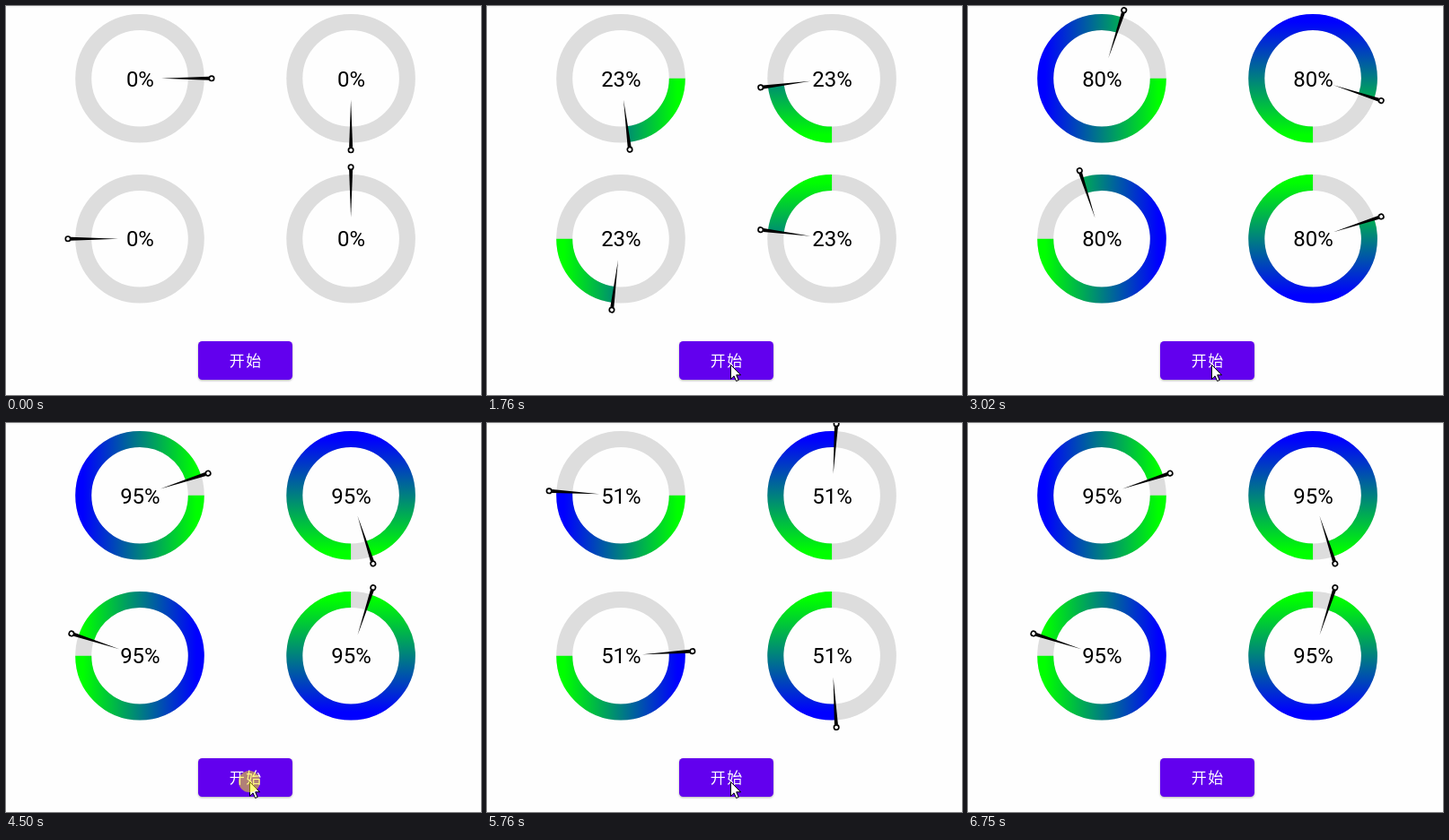
Recreate the animation shown at these times as an HTML page. Size 529 by 434 pixels, loop 7.74 s.

```html
<!DOCTYPE html>
<html lang="zh">
<head>
<meta charset="utf-8">
<style>
  html, body { margin: 0; width: 100%; height: 100%; overflow: hidden; background: #fefefe; }
  svg { display: block; width: 529px; height: 434px; }
  .value { font: 24px Roboto, sans-serif; text-anchor: middle; fill: #000; }
  .label { font: 17px "Noto Sans CJK SC", "Noto Sans CJK", sans-serif; letter-spacing: 1.5px; fill: #fff; }
  .button { fill: #6200ee; filter: drop-shadow(0 1px 1px rgba(0, 0, 0, .3)); }
</style>
</head>
<body>
<svg viewBox="0 0 529 434">
  <defs>
    <linearGradient id="sweep" gradientUnits="userSpaceOnUse" x1="63" y1="0" x2="-63" y2="0">
      <stop offset="0" stop-color="#0f0"/>
      <stop offset="1" stop-color="#00f"/>
    </linearGradient>
  </defs>
  <rect width="529" height="1.5" fill="#f6f6f6"/>
  <g id="dials"></g>
  <rect class="button" x="214" y="374" width="105" height="43" rx="4.5"/>
  <text class="label" x="248.7" y="402.3">开始</text>
  <path id="cursor" d="M0.5 0.5V16.2L4.1 12.8L6.6 18.5L9.2 17.4L6.7 11.7H11.6Z"
        fill="#fff" stroke="#000" stroke-width="1"/>
  <circle id="press" cx="271" cy="400" r="12" fill="#ff0" opacity=".5"/>
</svg>
<script>
  const LOOP = 7740, STEP = 70, RUN = 2100, GOAL = 95;
  const PRESSES = [[1140, 1270], [4500, 4640]];
  // first: first drawn step, origin: moment of zero progress
  const RUNS = [{ first: 1270, origin: 1240 }, { first: 4640, origin: 4622 }];
  // time, x, y of the pointer tip
  const POINTER = [
    [400, 278, 427], [470, 275, 414], [540, 273, 406], [670, 271, 402], [940, 271, 400],
    [6470, 271, 403], [6540, 272, 410], [6610, 274, 420], [6680, 276, 430]
  ];
  const POINTER_GONE = 6750;

  const byId = id => document.getElementById(id);

  // start: angle of zero; turn: 1 clockwise, -1 counterclockwise
  const dials = [
    { x: 149, y: 80.8, start: 0, turn: 1 },
    { x: 384.1, y: 80.8, start: 90, turn: 1 },
    { x: 149, y: 259.7, start: 180, turn: -1 },
    { x: 384.1, y: 259.7, start: 270, turn: -1 }
  ].map(({ x, y, start, turn }) => {
    const group = document.createElementNS("http://www.w3.org/2000/svg", "g");
    group.setAttribute("transform", `translate(${x} ${y})`);
    group.innerHTML = `
      <circle r="62.8" fill="none" stroke="#ddd" stroke-width="18"/>
      <g transform="rotate(${start}) scale(1 ${turn})">
        <circle class="arc" r="62.8" fill="none" stroke="url(#sweep)" stroke-width="18" pathLength="100"/>
        <g class="needle">
          <path d="M24 0L77 -2V2Z"/>
          <circle cx="80" r="2.7" fill="#fff" stroke="#000" stroke-width="1.7"/>
        </g>
      </g>
      <text class="value" x="0.4" y="8.7"></text>`;
    byId("dials").append(group);
    const find = name => group.querySelector("." + name);
    return { arc: find("arc"), needle: find("needle"), value: find("value") };
  });

  function percentAt(t) {
    const run = RUNS.findLast(r => t >= r.first);
    if (!run) return 0;
    const shown = run.first + Math.floor((t - run.first) / STEP) * STEP;
    return Math.floor(GOAL * Math.min(1, (shown - run.origin) / RUN));
  }

  function draw(t) {
    const percent = percentAt(t);
    for (const { arc, needle, value } of dials) {
      arc.setAttribute("stroke-dasharray", `${percent} 100`);
      arc.setAttribute("visibility", percent ? "visible" : "hidden");
      needle.setAttribute("transform", `rotate(${percent * 3.6})`);
      value.textContent = percent + "%";
    }
    const spot = t < POINTER_GONE && POINTER.findLast(p => t >= p[0]);
    byId("cursor").setAttribute("visibility", spot ? "visible" : "hidden");
    if (spot) byId("cursor").setAttribute("transform", `translate(${spot[1]} ${spot[2]})`);
    const pressed = PRESSES.some(([from, to]) => t >= from && t < to);
    byId("press").setAttribute("visibility", pressed ? "visible" : "hidden");
  }

  const begin = performance.now();
  function tick() {
    draw((performance.now() - begin) % LOOP);
    requestAnimationFrame(tick);
  }
  tick();
</script>
</body>
</html>
```
